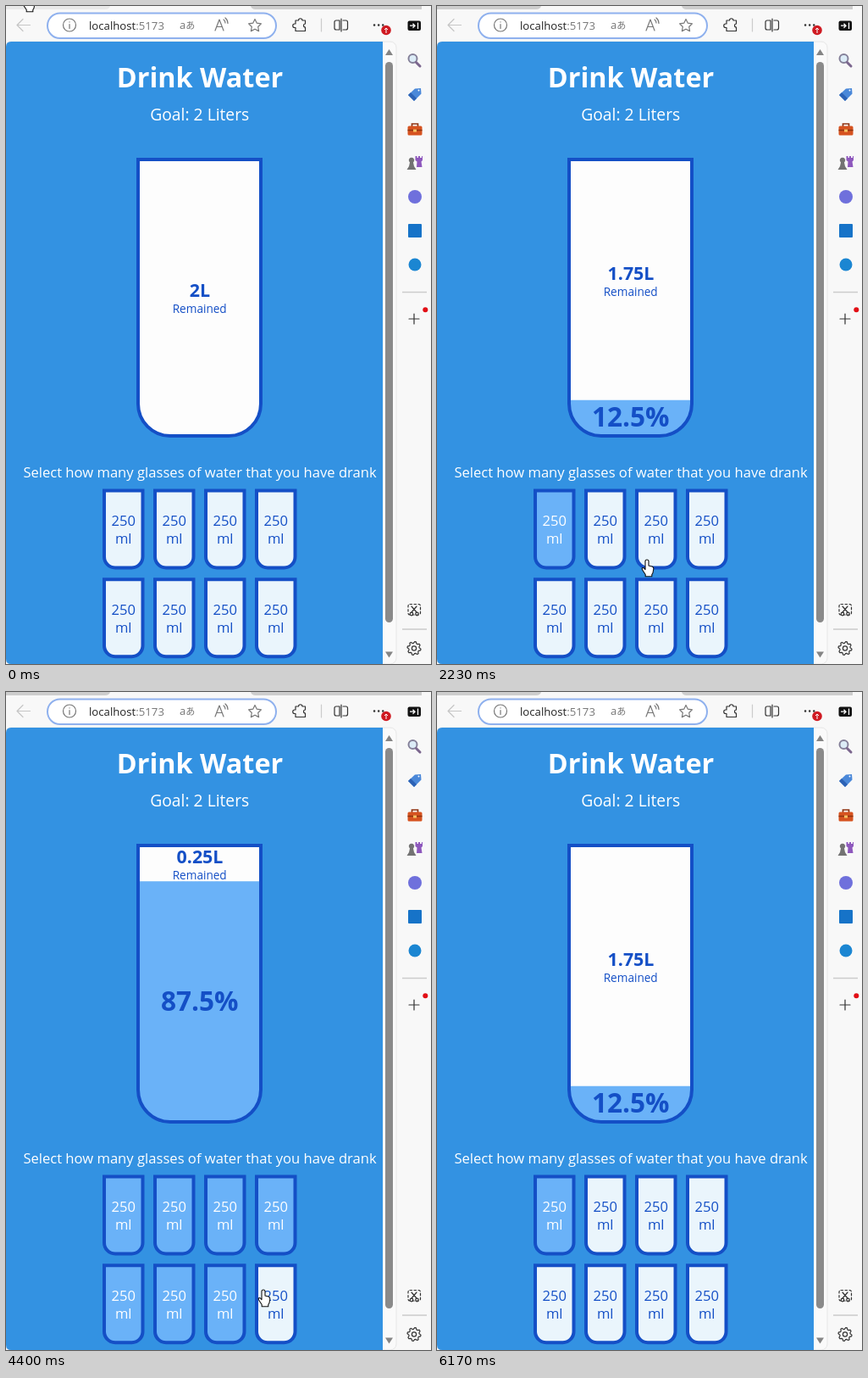
Write an HTML page that moves like this. It is 502 by 776 pixels and loops after 6410 ms.

```html
<!DOCTYPE html>
<html lang="en">
<head>
<meta charset="utf-8">
<title>Drink Water</title>
<style>
  html, body { margin: 0; width: 100%; height: 100%; overflow: hidden; background: #f8f8f8; }
  svg { display: block; width: 502px; height: 776px; }
  text { font-family: "Open Sans", "Noto Sans", sans-serif; }
  .mid { text-anchor: middle; }
  .bold { font-weight: 700; }
  .ink { fill: #144fc6; }
  .edge { fill: none; stroke: #144fc6; stroke-width: 4; }
  .icon { fill: none; stroke: #333; stroke-width: 1.2; stroke-linecap: round; stroke-linejoin: round; }
  .soft { stroke: #777; }
</style>
</head>
<body>
<svg viewBox="0 0 502 776">
  <defs>
    <path id="cup" d="M156 181V469a38 38 0 0 0 38 38H263a38 38 0 0 0 38-38V181Z"/>
    <clipPath id="inside"><use href="#cup"/></clipPath>
    <path id="glass" d="M2 2V80a13 13 0 0 0 13 13H34.5a13 13 0 0 0 13-13V2Z"/>
  </defs>

  <!-- browser bar -->
  <rect width="502" height="776" fill="#f8f8f8"/>
  <path id="tab" d="M0 0H123Q122 4 117 4H0Z" fill="#cdcdcd"/>
  <path d="M289 0H491V4H295Q290 4 289 0Z" fill="#cdcdcd"/>
  <rect x="49" y="8.500" width="270" height="29.500" rx="14.750" fill="#fff" stroke="#8fb1ee" stroke-width="2"/>
  <path class="icon" style="stroke:#c6c6c6" d="M28.500 22.500H13m7-7-7 7 7 7"/>
  <g class="icon soft">
    <circle cx="75" cy="22.500" r="7.500"/><path d="M75 21.500v5M75 18.800v.2"/>
    <path d="m294 15.500 2.300 4.700 5.100.7-3.700 3.600.9 5.100-4.600-2.400-4.600 2.400.9-5.100-3.700-3.600 5.100-.7Z"/>
    <path d="m247 29 5-13 5 13m-8.300-4.500h6.600M257 16q2 1.500 2 4M259 14q3 2.500 3 6.500"/>
  </g>
  <text x="98" y="28" font-size="13.2" fill="#222">localhost<tspan fill="#777">:5173</tspan></text>
  <text x="205" y="27" font-size="13" fill="#777">a<tspan font-size="11" style="font-family:'Noto Sans CJK JP','Noto Sans CJK',sans-serif">あ</tspan></text>
  <g class="icon">
    <path d="M342 17h3.500a2 2 0 0 1 4.500 0h3.500v4a2 2 0 0 0 0 4v4.500H342V25.500h-1a2 2 0 0 1 0-4.500h1Z"/>
    <path d="M372.500 15v15" stroke="#ccc"/>
    <path d="M394 17h-4q-2 0-2 2v7q0 2 2 2h4ZM398 17h3.500q2 0 2 2v7q0 2-2 2H398M396 15v15"/>
    <path d="M435 22.500h.1m5 0h.1m5 0h.1" stroke-width="2.500"/>
  </g>
  <circle cx="449" cy="28.500" r="5.800" fill="#cf1a22"/>
  <path d="M449 32v-6m-2 2 2-2 2 2" fill="none" stroke="#fff"/>
  <rect x="474.500" y="17.500" width="15.500" height="11.500" rx="2" fill="#111"/>
  <path d="M477 23.200h6m-2.500-2.500 2.500 2.500-2.500 2.500M486.500 19.500v7.500" fill="none" stroke="#fff" stroke-width="1.300"/>

  <!-- sidebar -->
  <circle cx="480.500" cy="62" r="5" fill="#dcecf7" stroke="#848099" stroke-width="2"/>
  <path d="m484.500 66.500 4.500 4.500" stroke="#7b668e" stroke-width="3" stroke-linecap="round"/>
  <path d="m475 105 8-7.500 7-.5.500 6.500-8.500 8.500Z" fill="#4a88d9"/>
  <path d="m475 105 3-3 7 7-3 3Z" fill="#2c62b5"/><circle cx="487.500" cy="99.500" r="1" fill="#fff"/>
  <path d="M479.500 142v-3h7v3" fill="none" stroke="#8f3412" stroke-width="1.700"/>
  <rect x="474.500" y="141.500" width="17" height="11" rx="1.500" fill="#d65320"/>
  <path d="M474.500 146.500h17" stroke="#8f3412" stroke-width="1.500"/><path d="M481 145.500h4v3h-4Z" fill="#f4c062"/>
  <path d="M483.500 177h2v2h1.500v-2h2v2H491v-2h1v5l-1.500 1.500 1 6.500h-6.500l.5-6.500-2-1.500Z" fill="#8e58bd"/>
  <path d="M476 183a3.200 3.200 0 1 1 6 0l-1 1.500 1 4.500 2.500 4h-11l2.500-4 1-4.500Z" fill="#737373"/>
  <circle cx="483" cy="225" r="8" fill="#6f70dc"/>
  <rect x="475" y="257" width="16" height="16" rx="1" fill="#1673c8"/>
  <circle cx="483" cy="305" r="7.500" fill="#1b86d2"/>
  <path d="M468 337.500h29M468 735h29" stroke="#ccc" stroke-width="1.300"/>
  <path class="icon" d="M476 369h12m-6-6v12"/>
  <circle cx="495.300" cy="358.300" r="3" fill="#e20f16"/>
  <rect class="icon" x="475" y="705.500" width="14.500" height="12.500" rx="2" stroke-dasharray="2.500 2.500"/>
  <path class="icon" d="m479 708 6 7m0-7-6 7"/><g class="icon" fill="#f8f8f8"><circle cx="479" cy="717" r="1.800"/><circle cx="485.500" cy="717" r="1.800"/></g>
  <path id="gear" class="icon"/><circle class="icon" cx="482" cy="757.500" r="2.600"/>

  <!-- page -->
  <rect x="-1" y="42" width="462" height="734" rx="7" fill="#fafafa" stroke="#e6e6e6"/>
  <path d="M445 42H6Q0 42 0 48V770Q0 776 6 776H445Z" fill="#3392e2"/>
  <rect x="448" y="66" width="9" height="661" rx="4.500" fill="#8a8a8a"/>
  <path d="m448 58 4.500-7 4.500 7ZM448 761.500l4.500 7 4.500-7Z" fill="#858585"/>
  <g class="mid" fill="#fff">
    <text class="bold" x="229" y="96" font-size="32.4">Drink Water</text>
    <text x="228.700" y="135" font-size="19.3">Goal: 2 Liters</text>
    <text x="229" y="556" font-size="16.6">Select how many glasses of water that you have drank</text>
  </g>
  <use href="#cup" fill="#fdfdfd"/>
  <g clip-path="url(#inside)" class="mid ink">
    <g id="remained">
      <text id="liters" class="bold" x="229" y="-1" font-size="21.4"></text>
      <text x="228.700" y="18" font-size="13.6">Remained</text>
    </g>
    <rect id="water" x="156" width="146" height="330" fill="#6ab2f8"/>
    <text id="percent" class="bold" x="228.700" font-size="31.6"></text>
  </g>
  <use href="#cup" class="edge"/>
  <g id="glasses" class="mid"></g>
  <path id="hand" d="M-2 2a2 2 0 0 1 4 0v5l4 1q2 .6 1.800 3l-.8 4.500-1.200 2v2.200h-7.600v-2.200l-3.600-5.500q-1-2 .4-2.400 1.400-.3 3 2Z" fill="#fff" stroke="#111" stroke-width="1.100" stroke-linejoin="round"/>
</svg>

<script>
const LOOP = 6410, FADE = 480, TOP = 183, BOTTOM = 505;
const $ = id => document.getElementById(id);

// Bursts of screen updates: first, last, count
const bursts = [
  [0, 0, 1], [80, 660, 6], [770, 890, 2], [1200, 1780, 6], [1890, 2000, 2],
  [2230, 2800, 6], [2910, 3020, 2], [3250, 3830, 6], [3940, 4400, 5],
  [4620, 5070, 5], [5370, 5920, 6], [6060, 6170, 2]
];
const ticks = bursts.flatMap(([from, to, n]) => Array.from({ length: n },
  (_, i) => Math.floor((from + (n > 1 ? (to - from) * i / (n - 1) : 0)) / 10) * 10));

// Clicks: time, glasses filled afterwards
const clicks = [[-FADE, 0], [1130, 1], [2270, 3], [3174, 7], [4560, 8], [5236, 1]];

// Pointer: time, x, y of the fingertip
const moves = [
  [0, 26, -13], [890, 126, 582], [1440, 126, 582], [2000, 246, 648], [2230, 248, 653],
  [2690, 248, 653], [3020, 254, 705], [3700, 254, 705], [4400, 304, 705],
  [4560, 304, 705], [5070, 129, 618], [5480, 129, 618], [6170, 27, -30], [LOOP, 27, -30]
];

const clamp = x => Math.min(1, Math.max(0, x));
const mix = (a, b, k) => a + (b - a) * k;
const smooth = x => x * x * (3 - 2 * x);
const color = (a, b, k) => `rgb(${a.map((v, i) => Math.round(mix(v, b[i], k)))})`;

// CSS "ease": cubic-bezier(.25, .1, .25, 1)
function ease(x) {
  x = clamp(x);
  let lo = 0, hi = 1;
  const curve = (a, b, s) => 3 * a * s * (1 - s) ** 2 + 3 * b * s * s * (1 - s) + s ** 3;
  for (let i = 0; i < 20; i++) {
    const s = (lo + hi) / 2;
    if (curve(.25, .25, s) < x) lo = s; else hi = s;
  }
  return curve(.1, 1, lo);
}

const glasses = Array.from({ length: 8 }, (_, i) => {
  $("glasses").insertAdjacentHTML("beforeend",
    `<g transform="translate(${114 + i % 4 * 60} ${569.5 + (i > 3) * 104.7})">
      <use href="#glass"/><use href="#glass" class="edge"/>
      <text font-size="16.6"><tspan x="24.7" y="43.5">250</tspan><tspan x="24.7" y="64.5">ml</tspan></text>
    </g>`);
  const g = $("glasses").lastElementChild;
  return { body: g.querySelector("use"), label: g.querySelector("text") };
});

$("gear").setAttribute("d", "M" + Array.from({ length: 32 }, (_, i) => {
  const a = (i + .5) * Math.PI / 16, r = i % 4 < 2 ? 8 : 6.2;
  return `${(482 + r * Math.cos(a)).toFixed(2)} ${(757.5 + r * Math.sin(a)).toFixed(2)}`;
}).join("L") + "Z");

function drawWater(t) {
  const at = clicks.findLastIndex(c => c[0] <= t);
  const [start, count] = clicks[at];
  const before = at ? clicks[at - 1][1] : 0;
  const k = ease((t - start) / FADE);
  const level = mix(BOTTOM, TOP, mix(before, count, k) / 8);

  $("water").setAttribute("y", level);
  $("liters").textContent = 2 - count / 4 + "L";
  $("remained").setAttribute("transform", `translate(0 ${(TOP + level) / 2})`);
  $("remained").setAttribute("visibility", count < 8 ? "visible" : "hidden");
  $("percent").textContent = count ? count * 12.5 + "%" : "";
  $("percent").setAttribute("y", (level + BOTTOM) / 2 + 11.5);

  glasses.forEach(({ body, label }, i) => {
    const full = mix(+(i < before), +(i < count), k);
    body.setAttribute("fill", color([234, 245, 252], [106, 178, 248], full));
    label.setAttribute("fill", color([20, 79, 198], [255, 255, 255], full));
  });
}

function drawHand(t) {
  const next = moves.findIndex(m => m[0] > t);
  const [t0, x0, y0] = moves[next - 1], [t1, x1, y1] = moves[next];
  const from = t0 || 40;
  const k = smooth(clamp((t - from) / (t1 - from)));
  $("hand").setAttribute("transform", `translate(${mix(x0, x1, k)} ${mix(y0, y1, k)})`);
  $("tab").setAttribute("fill", t < 80 ? "#e9e9e9" : "#cdcdcd");
}

function frame() {
  const now = performance.now() % LOOP;
  const t = ticks.findLast(x => x <= now);
  drawWater(t);
  drawHand(t);
  requestAnimationFrame(frame);
}
frame();
</script>
</body>
</html>
```
